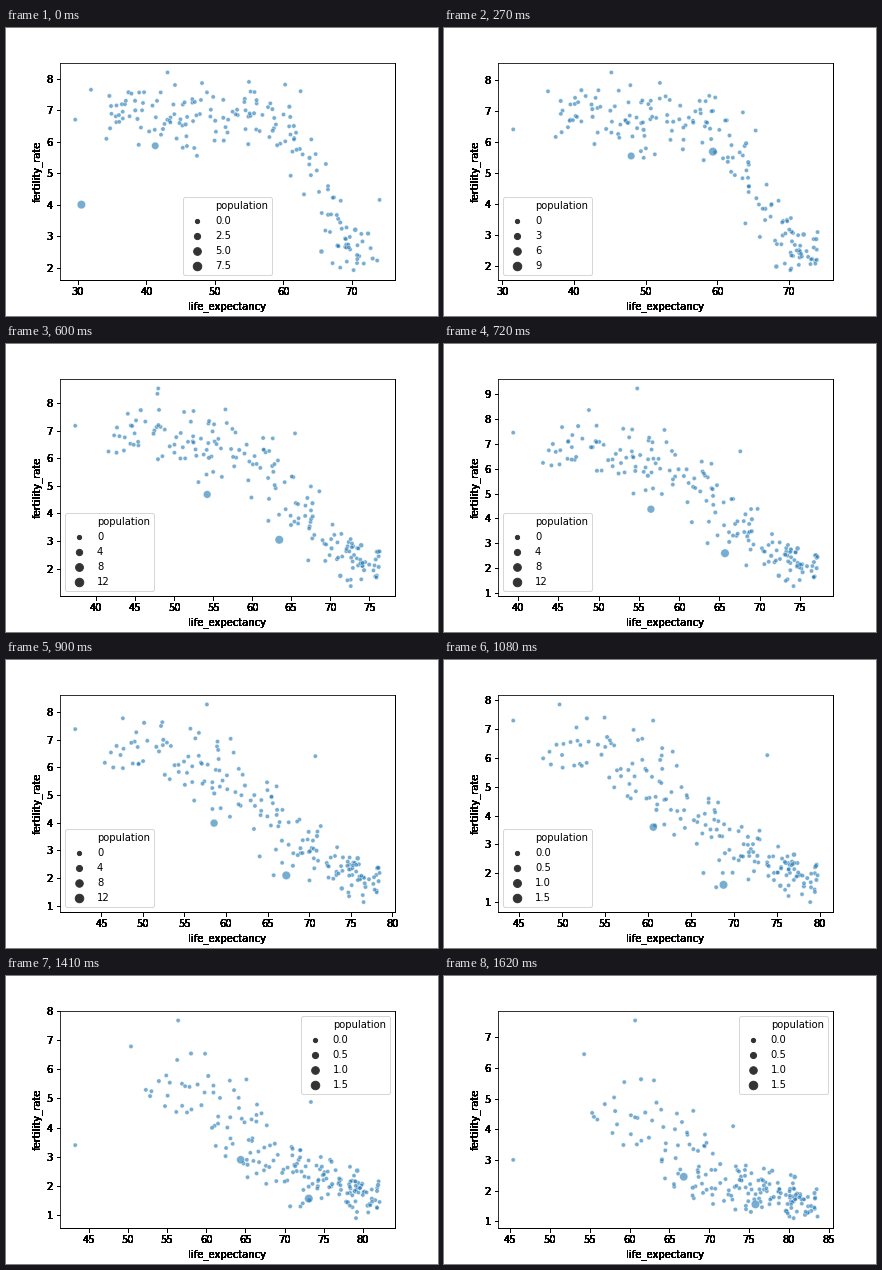
These frames come from a looping animation (432x288 px, 1.65 s). A matplotlib script:

```python
import numpy as np
import matplotlib.pyplot as plt
from matplotlib.animation import FuncAnimation
from matplotlib.lines import Line2D
from matplotlib.ticker import MaxNLocator

FRAMES, INTERVAL = 55, 30
POOR, RICH = 130, 45
MIN_SIZE, MAX_SIZE = 18, 72
INK_PASSES = 12

# Countries away from the cloud, as key points (frame, life, fertility)
SHORTEST = [(0, 29.6, 6.7), (9, 31.55, 6.42), (24, 39.4, 7.45),
            (36, 44.3, 7.3), (54, 54.3, 6.45)]
REVERSED = [(0, 47, 5.8), (36, 58, 4.6), (47, 43.3, 3.4), (54, 45.4, 3)]
LONGEST = [(0, 74.1, 4.15), (9, 74, 3.1), (54, 83.6, 1.15)]
FEWEST = [(0, 70.3, 1.92), (9, 70.2, 1.87), (15, 70.7, 1.48),
          (36, 78.9, 1), (47, 79.1, .9), (54, 80.6, 1.1)]
PEAKING = [(0, 31.9, 7.65), (15, 39.4, 7.65), (24, 54.8, 9.23),
           (36, 60.6, 7.3), (54, 68, 4.6)]
STEADY = [(0, 37, 7.3), (36, 49.7, 7.86), (54, 60.7, 7.55)]
EARLY_HIGH = [(0, 43.1, 8.2), (24, 48.8, 8.36), (54, 65.7, 4)]
LATE_HIGH = [(0, 55, 7.9), (36, 73.9, 6.1), (54, 73, 4.1)]
INDIA = [(0, 41.3, 5.87), (9, 48, 5.56), (24, 56.5, 4.37), (54, 66.8, 2.45)]
CHINA = [(0, 30.5, 4), (3, 50, 6.8), (9, 59.4, 5.7), (15, 60.7, 3.6),
         (24, 65.7, 2.6), (36, 68.8, 1.6), (54, 75.8, 1.55)]
TRACKS = [SHORTEST, REVERSED, LONGEST, FEWEST, PEAKING, STEADY,
          EARLY_HIGH, LATE_HIGH, INDIA, CHINA]

# Short crises: first frame, last frame, life, fertility
CRISES = [(15, 18, 21.6, 5.63), (34, 34, 13.2, 6.3), (50, 50, 32.2, 3.4)]


def along(track, k):
    times, life, fertility = zip(*track)
    return np.interp(k, times, life), np.interp(k, times, fertility)


def cloud(k):
    """Life rises with rank and time; fertility falls along a logistic."""
    t = k / (FRAMES - 1)
    drift = .85 * noise + .5 * np.sin(2.5 * t + phase)
    low, high = 34.5 + 21 * t, 73 + 10 * t
    life = low + (high - low) * rank ** (1.1 - .45 * t) + 1.1 * drift[0]

    most, least = 6.8 - 1.6 * t ** 3, 2.4 - .85 * t
    share = 1 / (1 + np.exp((life - 65) / (2 + 3 * t)))
    spread = .3 + .3 * share + 2 * share * (1 - share)
    fertility = least + (most - least) * share + spread * drift[1]
    return np.column_stack([life, fertility])


def positions(k):
    edge = np.array([along(track, k) for track in TRACKS])
    inner = np.clip(cloud(k), edge.min(axis=0) + inset,
                    edge.max(axis=0) - inset)
    for first, last, life, fertility in CRISES:
        if first <= k <= last:
            inner[0] = life, fertility
    return np.concatenate([inner, edge])


def populations(k):
    """Population in units of 100 million, the two giants last."""
    india = 4.5 + .157 * k
    china = 6.6 + .19 * k - .001 * k ** 2
    return np.append(people * (1 + k / 54), [india, china])


def marker_size(people_now, largest):
    share = np.clip(people_now / largest, 0, 1)
    return MIN_SIZE + (MAX_SIZE - MIN_SIZE) * share


def legend_place(k):
    if k < 2:
        return 'lower center'
    if 15 <= k < 19:
        return 'upper left'
    return 'lower left' if k < 42 else 'upper right'


def draw_legend(k, largest):
    ticks = MaxNLocator(nbins=3).tick_values(0, largest)
    shown = ticks / 10 if ticks[-1] >= 15 else ticks
    digits = 0 if np.all(shown % 1 == 0) else 1
    for sample, tick in zip(samples, ticks):
        sample.set_sizes([marker_size(tick, largest)])
    labels = ['population'] + [f'{value:.{digits}f}' for value in shown]
    ax.legend([blank] + samples, labels, loc=legend_place(k))


def padded(values):
    margin = .05 * np.ptp(values)
    return values.min() - margin, values.max() + margin


def update(k):
    xy, pop = positions(k), populations(k)
    dots.set_offsets(xy)
    dots.set_sizes(marker_size(pop, pop.max()))
    ax.set_xlim(*padded(xy[:, 0]))
    ax.set_ylim(*padded(xy[:, 1]))
    draw_legend(k, pop.max())
    return dots,


def ink_heavily(artist, parts):
    """Draw the artist, then its parts again until soft edges turn black."""
    draw_once = artist.draw

    def draw(renderer):
        draw_once(renderer)
        for part in parts():
            for _ in range(INK_PASSES):
                part.draw(renderer)

    artist.draw = draw


def axis_parts(axis):
    low, high = axis.get_view_interval()
    ticks = [tick for tick in axis.get_major_ticks()
             if low <= tick.get_loc() <= high]
    return [axis.label] + ticks


rng = np.random.default_rng(5)
rank = np.concatenate([rng.uniform(0, .82, POOR), rng.uniform(.82, 1, RICH)])
noise = np.clip(rng.normal(size=(2, POOR + RICH)), -2, 2)
phase = rng.uniform(0, 2 * np.pi, noise.shape)
inset = rng.uniform(.05, .4, (POOR + RICH, 2))
people = np.clip(np.exp(rng.normal(-3, 1.2, POOR + RICH)), 0, 1.2)
people = np.append(people, np.full(len(TRACKS) - 2, .05))

fig = plt.figure(figsize=(6, 4), dpi=72, facecolor='white')
ax = fig.add_axes([.125, .125, .775, .755])
ax.set_xlabel('life_expectancy')
ax.set_ylabel('fertility_rate')
for axis in (ax.xaxis, ax.yaxis):
    ink_heavily(axis, lambda axis=axis: axis_parts(axis))
for side in ('bottom', 'right'):
    # A second pass of the line itself; its class method avoids recursion
    spine = ax.spines[side]
    spine.set_linewidth(1)

dots = ax.scatter([], [], color='#1f77b4', edgecolor='white',
                  linewidth=.6, alpha=.6)
samples = [ax.scatter([], [], color='.2') for _ in range(4)]
blank = Line2D([], [], linestyle='none')

anim = FuncAnimation(fig, update, frames=FRAMES, interval=INTERVAL,
                     init_func=lambda: update(0), repeat=True, repeat_delay=0)
plt.show()
```
